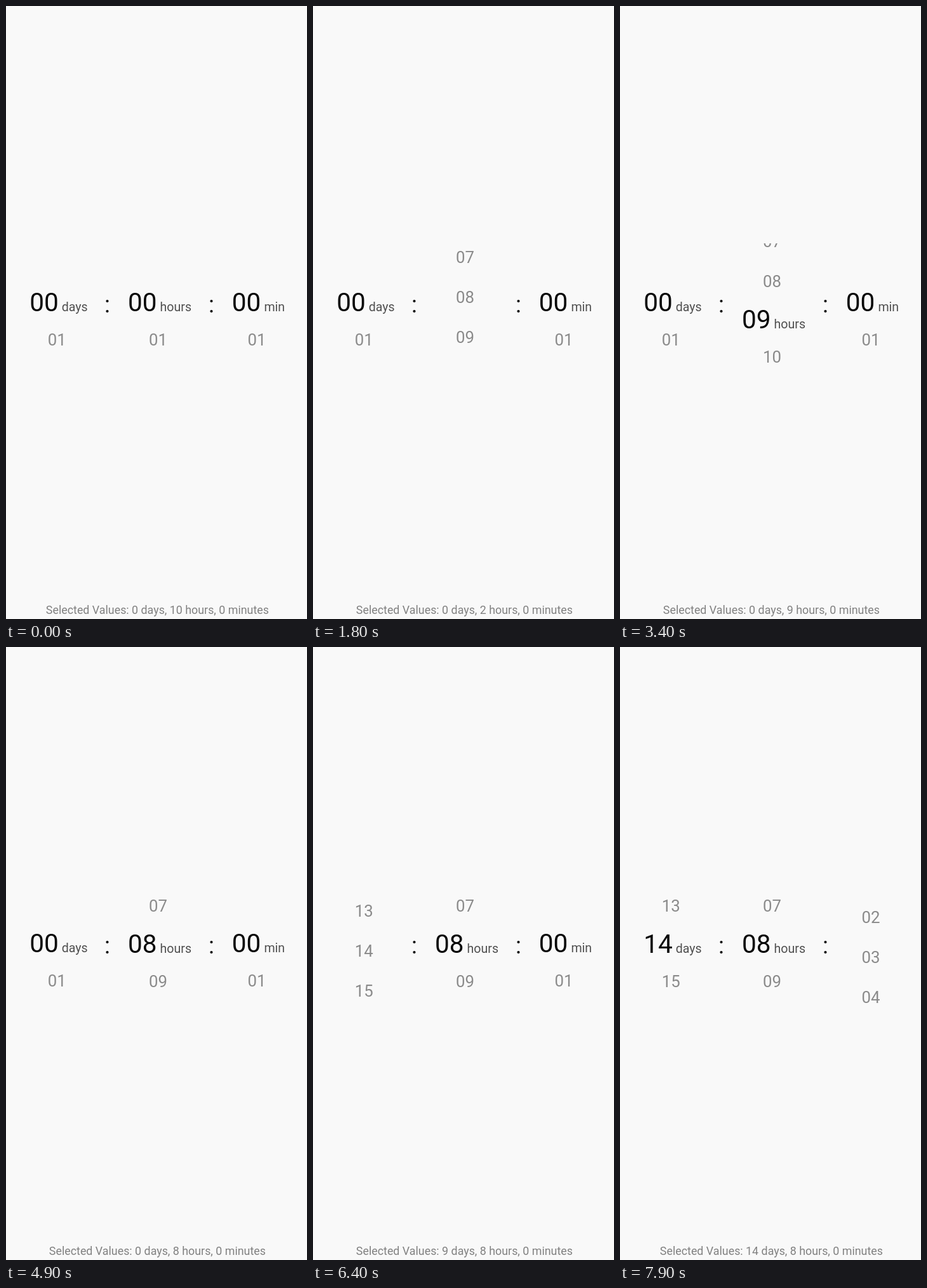
These frames come from a looping animation (474x966 px, 8000 ms). An HTML page:

```html
<!DOCTYPE html>
<html lang="en">
<head>
<meta charset="utf-8">
<title>Duration picker</title>
<style>
  html, body { margin: 0; width: 100%; height: 100%; overflow: hidden; background: #f9f9f9; }
  svg { display: block; width: 474px; height: 966px; font-family: Roboto, sans-serif; }
  text { text-anchor: middle; }
  .num { font-size: 25.8px; fill: #8b8b8b; }
  .unit { font-size: 19.6px; fill: #505050; display: none; }
  .on .num { font-size: 40.5px; fill: #080808; }
  .on .unit { display: inline; }
  .colon { font-size: 37px; fill: #111; }
  #summary { font-size: 17.85px; fill: #818181; }
</style>
</head>
<body>
<svg viewBox="0 0 474 966">
  <clipPath id="window"><rect y="374" width="474" height="190"/></clipPath>
  <g id="list" clip-path="url(#window)"></g>
  <text class="colon" x="159.5" y="483">:</text>
  <text class="colon" x="323.5" y="483">:</text>
  <text id="summary" x="238.4" y="958"></text>
</svg>
<script>
const LOOP = 8000, STEP = 100;
const MID = 471, ROW = 63;
const SHRINK = 7;            // the chosen row is this much lower than the others
const TOP = 1 / ROW;         // an untouched wheel rests one pixel higher
const list = document.getElementById('list');
const summary = document.getElementById('summary');

// A fling starts at `at`, lands on `to` after `dur`; the summary shows it from `told` on
const wheels = [
  { unit: 'days', x: 80.3, told: 0, flings: [
    { at: 5000, dur: 800, to: 9, told: 6100 },
    { at: 5900, dur: 690, to: 14, told: 6800 }] },
  { unit: 'hours', x: 239.4, told: 10, flings: [
    { at: 400, dur: 730, to: 2, told: 1300 },
    { at: 1300, dur: 845, to: 9, told: 2500 },
    { at: 3200, dur: 630, to: 8, told: 4300 }] },
  { unit: 'min', name: 'minutes', x: 394.9, told: 0, flings: [
    { at: 7600, dur: 800, to: 5, told: LOOP }] }
];

const glide = u => 1 - (1 - u * u) ** 5;

function add(parent, tag, cls, text = '') {
  const el = document.createElementNS('http://www.w3.org/2000/svg', tag);
  el.setAttribute('class', cls);
  el.textContent = text;
  return parent.appendChild(el);
}

for (const w of wheels) {
  w.rows = Array.from({ length: 20 }, (_, i) => {
    const row = add(list, 'text', 'row');
    add(row, 'tspan', 'num', String(i).padStart(2, '0'));
    add(row, 'tspan', 'unit', w.unit).setAttribute('dx', 5);
    return row;
  });
}

function wheelState(w, t) {
  let pos = TOP, chosen = 0, told = w.told;
  for (const f of w.flings) {
    if (t < f.at) break;
    if (t < f.at + f.dur) {
      // rows below the chosen one sit SHRINK higher until a new row is chosen
      const end = f.to > chosen ? f.to - SHRINK / ROW : f.to;
      pos += (end - pos) * glide((t - f.at) / f.dur);
    } else {
      pos = chosen = f.to;
    }
    if (t >= f.told) told = f.to;
  }
  return { pos, chosen, told };
}

function drawWheel(w, { pos, chosen }) {
  w.rows.forEach((row, i) => {
    const on = i === chosen;
    const lift = on ? SHRINK / 2 : i > chosen ? SHRINK : 0;
    const y = MID + ROW * (i - pos) - lift;
    row.setAttribute('class', on ? 'row on' : 'row');
    row.setAttribute('x', on ? w.x + 2.6 : w.x);
    row.setAttribute('y', (y + (on ? 14.5 : 9.2)).toFixed(2));
  });
}

function draw(t) {
  const parts = wheels.map(w => {
    const state = wheelState(w, t);
    drawWheel(w, state);
    return `${state.told} ${w.name || w.unit}`;
  });
  summary.textContent = 'Selected Values: ' + parts.join(', ');
}

const begin = performance.now();
function tick() {
  const t = (performance.now() - begin) % LOOP;
  draw(Math.floor(t / STEP) * STEP);
  requestAnimationFrame(tick);
}
draw(0);
requestAnimationFrame(tick);
</script>
</body>
</html>
```
